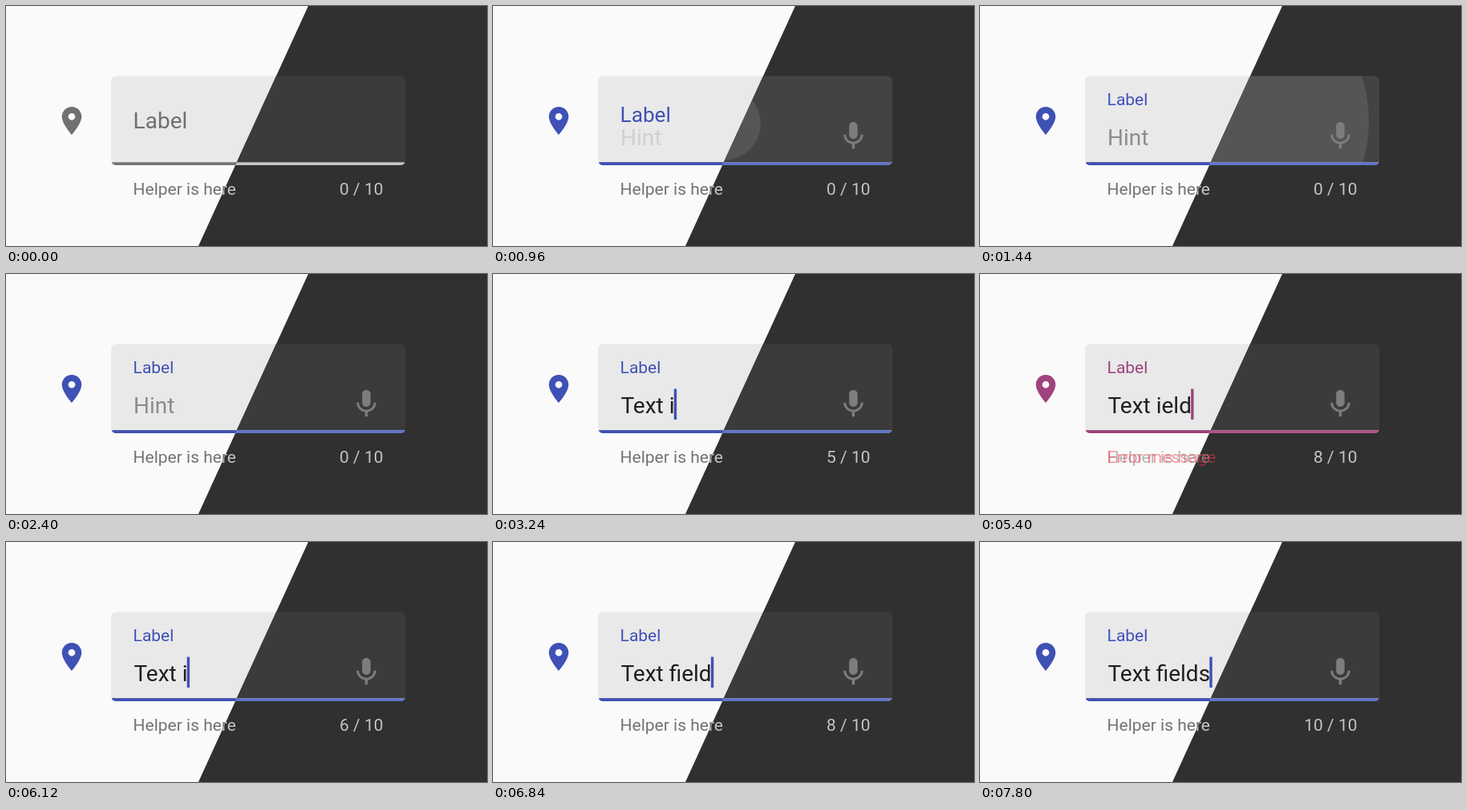
Animation, 600 px wide and 300 px high, one loop 8000 ms. Source, as an HTML page:

```html
<!DOCTYPE html>
<html lang="en">
<head>
<meta charset="utf-8">
<title>Text field</title>
<style>
  html, body { margin: 0; width: 100%; height: 100%; overflow: hidden; }
  svg { display: block; width: 600px; height: 300px; font-family: Roboto, sans-serif; }
  text { white-space: pre; font-size: 21px; }
  .big { font-size: 28px; }
  .light { --bg: #fafafa; --box: #e9e9e9; --muted: #737373; --line: #757575; --ink: #1f1f1f; --veil: none; }
  .dark { --bg: #303030; --box: #3b3b3b; --muted: #c4c4c4; --line: #c4c4c4; --ink: #fff; --veil: #fff; }
  .bg { fill: var(--bg); }
  .box { fill: var(--box); }
  .veil, .ripple { fill: var(--veil); }
  .line { fill: var(--line); }
  .helper, .counter { fill: var(--muted); }
  .counter { text-anchor: end; }
  .hint { fill: #8c8c8c; }
  .typed { fill: var(--ink); }
  .error, .handle { fill: #ff3347; }
  .mic { fill: #7d7d7d; }
</style>
</head>
<body>
<svg viewBox="0 0 600 300">
  <defs>
    <clipPath id="half"><path d="M377 0H600V300H240Z"/></clipPath>
    <clipPath id="field"><rect x="131.3" y="87.6" width="366.9" height="111.4" rx="6"/></clipPath>
  </defs>
  <g class="light"></g>
  <g class="dark" clip-path="url(#half)"></g>
</svg>
<script>
const LOOP = 8000, STEP = 120, LEFT = 158.6;
const GREY = [112, 112, 112], RED = [255, 51, 71];

const scene = `
  <rect class="bg" width="600" height="300"/>
  <g clip-path="url(#field)">
    <rect class="box" x="131" y="87" width="368" height="113"/>
    <rect class="veil" x="131" y="87" width="368" height="113"/>
    <circle class="ripple"/>
    <rect class="line" x="131" y="195.3" width="368" height="4"/>
    <rect class="active" y="195.3" height="4"/>
  </g>
  <path class="pin" fill-rule="evenodd" transform="translate(61 122.5) scale(1.75)"
    d="M12 2C8.13 2 5 5.13 5 9c0 5.25 7 13 7 13s7-7.75 7-13c0-3.87-3.13-7-7-7zm0 9.5a2.5 2.5 0 1 1 0-5 2.5 2.5 0 0 1 0 5z"/>
  <path class="mic" transform="translate(428.5 141.5) scale(1.75)"
    d="M12 14c1.66 0 3-1.34 3-3V5c0-1.66-1.34-3-3-3S9 3.34 9 5v6c0 1.66 1.34 3 3 3zm5.3-3c0 3-2.54 5.1-5.3 5.1S6.7 14 6.7 11H5c0 3.41 2.72 6.23 6 6.72V21h2v-3.28c3.28-.48 6-3.3 6-6.72z"/>
  <text class="label" x="${LEFT}">Label</text>
  <text class="hint big" x="${LEFT + .4}" y="173.5">Hint</text>
  <text class="typed big" x="${LEFT + .9}" y="173.5"></text>
  <rect class="cursor" y="143.6" width="3.4" height="38.4"/>
  <text class="helper" x="${LEFT}" y="235.6">Helper is here</text>
  <text class="error" x="${LEFT}" y="235.6">Error message</text>
  <text class="counter" x="470.6" y="235.6"></text>
  <path class="handle" d="M281 181.5L293.7 193.3A18 18 0 1 1 268.3 193.3Z"/>`;

const names = ["veil", "ripple", "active", "pin", "mic", "label", "hint", "typed",
  "cursor", "helper", "error", "counter", "handle"];

const themes = [["light", [63, 81, 181]], ["dark", [96, 116, 200]]].map(([name, blue]) => {
  const root = document.querySelector("." + name);
  root.innerHTML = scene;
  const el = Object.fromEntries(names.map(n => [n, root.querySelector("." + n)]));
  return { el, blue };
});

// Each entry holds until the next one.
const edits = [
  [0, ""], [2640, "T"], [2760, "Te"], [2880, "Tex"], [3000, "Text"], [3120, "Text i"],
  [3360, "Text ie"], [3480, "Text iel"], [3600, "Text ield"], [3720, "Text ields"],
  [5280, "Text ield"], [5640, "Text iel"], [5880, "Text ie"], [6120, "Text i"],
  [6240, "Text "], [6360, "Text f"], [6480, "Text fi"], [6600, "Text fie"],
  [6720, "Text fiel"], [6840, "Text field"], [6960, "Text fields"]
];

const textAt = t => edits.reduce((found, [at, s]) => (t >= at ? s : found), "");
const ramp = (t, a, b) => Math.min(1, Math.max(0, (t - a) / (b - a)));
const smooth = x => x * x * (3 - 2 * x);
const mix = (a, b, k) => `rgb(${a.map((v, i) => Math.round(v + (b[i] - v) * k))})`;
const set = (node, attrs) => {
  for (const key in attrs) node.setAttribute(key, attrs[key]);
};

function draw(t) {
  const focus = smooth(ramp(t, 0, 840));
  const lift = smooth(ramp(t, 720, 1440));
  const spread = ramp(t, 840, 1560);
  const fade = 1 - ramp(t, 1680, 2400);
  const error = smooth(ramp(t, 3600, 3960)) * (1 - smooth(ramp(t, 5160, 5640)));
  const text = textAt(t);
  const count = textAt(t - STEP).replace(" ", "").length;
  const caret = (t >= 2640 && t < 3960) || (t >= 5280 && t < 7080) || t >= 7800;
  const handle = t < 5280 ? ramp(t, 4560, 4920) : 0;

  for (const { el, blue } of themes) {
    const accent = mix(blue, RED, error);
    const tint = focus < 1 ? mix(GREY, blue, focus) : accent;

    set(el.veil, { opacity: .045 * focus * fade });
    set(el.ripple, {
      cx: 284 + 27 * spread, cy: 148 - 5 * spread,
      r: spread && 12 + 200 * spread, opacity: .095 * fade
    });
    set(el.active, { x: 314.8 - 184 * focus, width: 368 * focus, fill: accent });
    set(el.pin, { fill: tint });
    set(el.mic, { opacity: focus });
    set(el.label, { y: 152.8 - 28.6 * lift, fill: tint });
    el.label.style.fontSize = 28 - 7 * lift + "px";
    set(el.hint, { opacity: text ? 0 : lift });
    el.typed.textContent = text;
    set(el.cursor, {
      x: LEFT + .1 + el.typed.getComputedTextLength(),
      opacity: caret ? 1 : 0, fill: accent
    });
    set(el.helper, { opacity: 1 - error });
    set(el.error, { opacity: error });
    el.counter.textContent = count + " / 10";
    set(el.handle, { opacity: handle });
  }
}

let last = -1;
const start = performance.now();

function tick() {
  const t = Math.floor((performance.now() - start) % LOOP / STEP) * STEP;
  if (t !== last) draw(last = t);
  requestAnimationFrame(tick);
}
tick();
</script>
</body>
</html>
```
